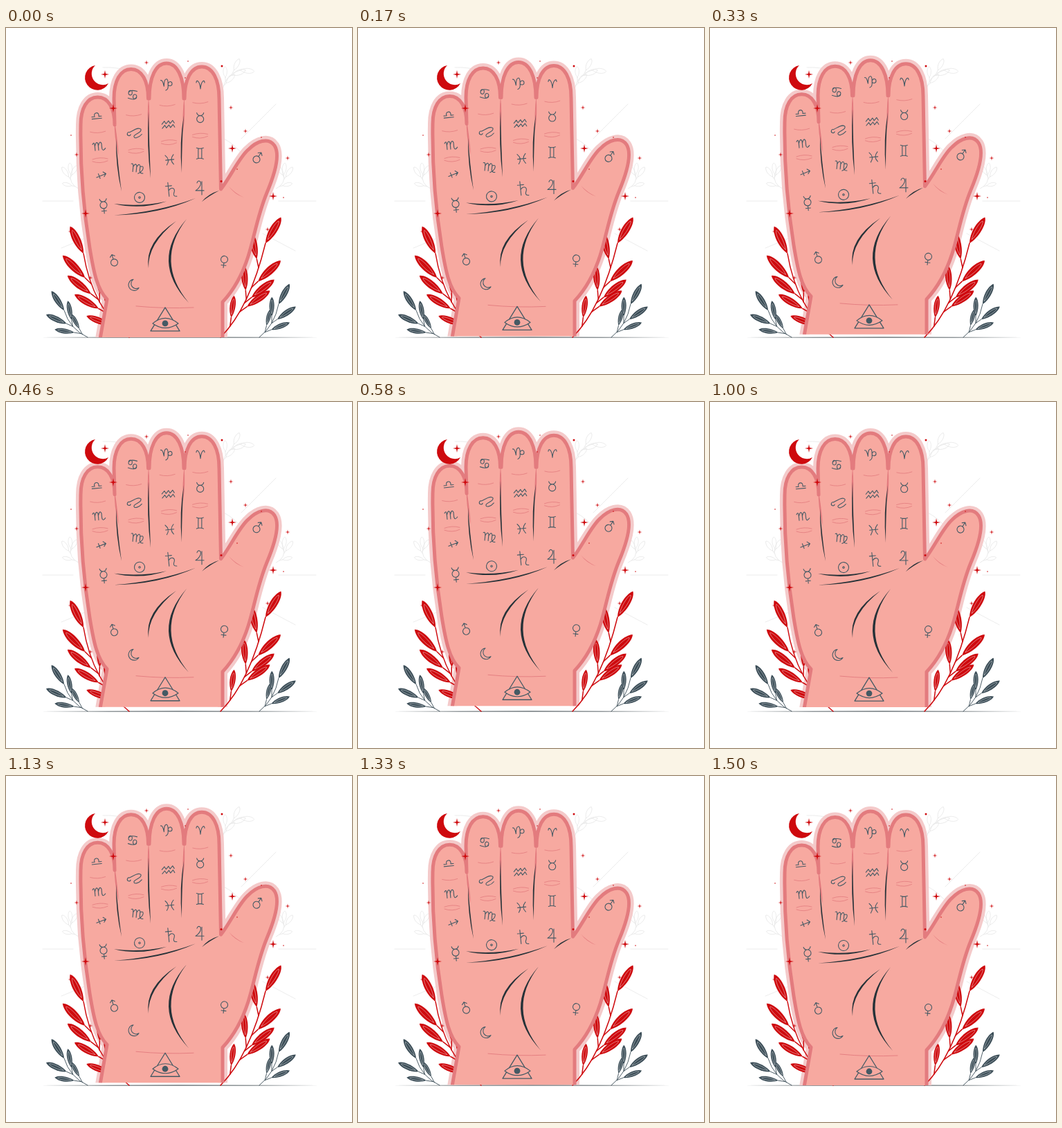
Write an HTML page with a canvas that moves like this. It is 500 px wide and 500 px high and loops after 1540 ms.

```html
<!DOCTYPE html>
<html lang="en">
<head>
<meta charset="utf-8">
<title>Palm reading</title>
<style>
html, body { margin: 0; width: 100%; height: 100%; overflow: hidden; background: #fff; }
canvas { display: block; width: 500px; height: 500px; }
</style>
</head>
<body>
<canvas id="stage"></canvas>
<script>
const LOOP = 1540, LEAD = 50, LIFT = 8.4, GROUND = 447, DEG = Math.PI / 180;
const RED = '#ce0a0e', SLATE = '#455a64', INK = '#263238', LEAF = '#3b4d57';
const SKIN = '#f7a9a0', EDGE = '#e37b7e', HALO = '#f4caca', FAINT = '#e8e8e8';

const canvas = document.getElementById('stage');
const ratio = window.devicePixelRatio || 1;
canvas.width = canvas.height = 500 * ratio;
const ctx = canvas.getContext('2d');
ctx.lineCap = ctx.lineJoin = 'round';

const mix = (a, b, u) => a + (b - a) * u;

function stroke(path, color, width) {
  ctx.strokeStyle = color;
  ctx.lineWidth = width;
  ctx.stroke(new Path2D(path));
}

function fill(path, color) {
  ctx.fillStyle = color;
  ctx.fill(new Path2D(path));
}

function place(x, y, angle, draw) {
  ctx.save();
  ctx.translate(x, y);
  ctx.rotate(angle);
  draw();
  ctx.restore();
}

function dot(x, y, r, color) {
  ctx.fillStyle = color;
  ctx.beginPath();
  ctx.arc(x, y, r, 0, 7);
  ctx.fill();
}

function star(x, y, r) {
  ctx.fillStyle = RED;
  ctx.beginPath();
  for (let k = 0; k < 8; k++) {
    const reach = k % 2 ? r * 0.24 : r;
    ctx.lineTo(x + reach * Math.cos(k * 45 * DEG), y + reach * Math.sin(k * 45 * DEG));
  }
  ctx.fill();
}

// A stroke that swells in the middle and ends in points.
function taper([x0, y0], [cx, cy], [x1, y1], w, color = INK) {
  const len = Math.hypot(x1 - x0, y1 - y0);
  const nx = (y0 - y1) / len * w, ny = (x1 - x0) / len * w;
  fill(`M${x0} ${y0}Q${cx + nx} ${cy + ny} ${x1} ${y1}Q${cx - nx} ${cy - ny} ${x0} ${y0}`, color);
}

function leaf(x, y, angle, len, color) {
  const blade = (s, w) => `M${len * (1 - s)} 0C${len * 0.3} ${-w} ${len * 0.78} ${-w} ${len * s} 0` +
    `C${len * 0.85} ${w} ${len * 0.3} ${w} ${len * (1 - s)} 0`;
  const w = len * 0.17;
  place(x, y, angle, () => {
    if (color === FAINT) return stroke(blade(1, w * 1.4), FAINT, 0.8);
    fill(blade(1, w), color);
    stroke(blade(0.85, w * 0.45), '#fff', 0.4);
  });
}

// A curved stem with stalked leaves; side is -1 when it leans left, 1 when right.
function sprig([from, bend, to], side, size, outer, inner, color) {
  const at = t => [0, 1].map(k => mix(mix(from[k], bend[k], t), mix(bend[k], to[k], t), t));
  const heading = t => Math.atan2(
    mix(bend[1] - from[1], to[1] - bend[1], t), mix(bend[0] - from[0], to[0] - bend[0], t));
  const width = color === RED ? 1.5 : 0.9;
  stroke(`M${from}Q${bend} ${to}`, color, width);
  leaf(...to, heading(1) + side * 17 * DEG, size * 0.95, color);

  const branch = (t, turn, len) => {
    const [x, y] = at(t), angle = heading(t) + side * turn * DEG;
    const bx = x + Math.cos(angle) * size * 0.28, by = y + Math.sin(angle) * size * 0.28;
    stroke(`M${x} ${y}L${bx} ${by}`, color, width);
    leaf(bx, by, angle, len * (0.75 + 0.35 * t), color);
  };
  for (const t of outer) branch(t, 25, size);
  for (const t of inner) branch(t, -30, size * 0.86);
}

function drawBackdrop() {
  stroke('M53 250H97M394 250H448M340 160L390 110M307 157Q322 161 338 178M371 297L418 322M80 318L116 303M140 57Q163 56 183 64', FAINT, 0.8);
  sprig([[312, 94], [316, 66], [339, 61]], 1, 21, [0.2, 0.55], [0.35, 0.7], FAINT);
  for (const side of [-1, 1]) {
    const x = d => 247.5 + side * d;
    sprig([[x(143), 232], [x(157), 225], [x(154), 211]], side, 17, [0.2, 0.7], [0.8], FAINT);
  }
}

function drawPlants() {
  sprig([[178, 447], [125, 405], [112, 326]], -1, 46, [0.15, 0.36, 0.53, 0.7], [0.3, 0.5], RED);
  sprig([[310, 447], [352, 405], [375, 311]], 1, 46, [0.36, 0.46, 0.62], [0.17, 0.5, 0.8], RED);
  sprig([[118, 447], [92, 435], [84, 408]], -1, 35, [0.2, 0.5], [0.15, 0.5], LEAF);
  sprig([[366, 447], [388, 430], [394, 399]], 1, 35, [0.2, 0.5], [0.2, 0.5], LEAF);
}

const RING = 'M-5 0A5 5 0 1 1 5 0A5 5 0 1 1 -5 0';
const HORNS = 'M-5 -9Q-4 -5 0 -5Q4 -5 5 -9';
const CROSS = 'M0 5V12M-3.5 8.5H3.5';
const MARS = RING + 'M0 -5V-12M-3.5 -9L0 -12L3.5 -9';
const SUN = 'M-7.5 0A7.5 7.5 0 1 1 7.5 0A7.5 7.5 0 1 1 -7.5 0M-1.2 0A1.2 1.2 0 1 1 1.2 0A1.2 1.2 0 1 1 -1.2 0';
const WAVE = 'l4 -4l2 4l4 -4l2 4l4 -4l2 4';

// Each finger: sides, tip and shoulder heights, then its column of signs from tip to palm.
const FINGERS = [
  { l: 108, r: 157, top: 100, shoulder: 140, from: [131, 128], to: [141, 256], bend: 0, tilt: -0.1, signs: [
    'M-7 3H7M-7 0H-3C-5 -7 5 -7 3 0H7',
    'M-9 -3Q-6 -8 -6 0V6V0Q-3 -9 -1 -3V6V0Q2 -9 4 -3V4Q5 9 9 4',
    'M-7 2L7 -2M3 -5L7 -2L4 2M-4 -3L-2 4',
    RING + HORNS + CROSS] },
  { l: 156, r: 205.5, top: 59.5, shoulder: 102, from: [183, 96], to: [193, 245], bend: 8, tilt: 0.1, signs: [
    'M-6 -2A2.6 2.6 0 1 1 -1 -2A2.6 2.6 0 1 1 -6 -2Q-5 -7 6 -5M1 3A2.6 2.6 0 1 1 6 3A2.6 2.6 0 1 1 1 3M6 3Q5 9 -6 6',
    'M-6 2A2.5 2.5 0 1 1 -8 -1C-4 -3 4 -11 8 -7C10 -2 0 0 -1 4C-1 8 6 6 10 0',
    'M-9 -5Q-6 -7 -6 0V6V-1Q-3 -8 -1 -3V6V-1Q2 -8 4 -3V4Q5 8 9 7M4 -2Q10 -5 8 2Q6 6 2 8',
    SUN] },
  { l: 207, r: 257, top: 51, shoulder: 102, from: [232, 81], to: [239, 235], bend: 8, tilt: -0.1, signs: [
    'M-8 -6Q-5 -7 -4 3Q-3 -8 1 -7Q3 -6 2 2Q2 8 -2 9M2 2C2 -4 8 -4 8 0C8 4 3 4 2 1',
    'M-9 -1' + WAVE + 'M-9 5' + WAVE,
    'M-6 -7Q1 0 -5 7M6 -7Q-1 0 5 7M-6 0H6',
    'M-4 -12V8M-8 -7H1M-4 0C0 -6 6 -3 4 2C2 6 2 9 7 9'] },
  { l: 258, r: 308, top: 56, shoulder: 102, from: [281, 82], to: [280, 231], bend: 0, tilt: 0, signs: [
    'M-6 -3C-6 -8 -1 -6 0 6C1 -6 6 -8 6 -3',
    RING + HORNS,
    'M-5 -8Q0 -6 5 -8M-5 8Q0 6 5 8M-2.5 -7V7M2.5 -7V7',
    'M-4 -7C-3 -12 3 -10 1 -4Q-1 1 -6 4H6M3 -9V10'] }
];

function fingertip({ l, r, top, shoulder }) {
  const mid = (l + r) / 2, w = (r - l) * 0.31, y = mix(top, shoulder, 0.4);
  return `L${l} ${shoulder}C${l} ${y} ${mid - w} ${top} ${mid} ${top}` +
    `C${mid + w} ${top} ${r} ${y} ${r} ${shoulder}`;
}

const HAND = 'M135 455L146 392C132 378 127 355 121 318C113 268 107 205 108 140' +
  FINGERS.map(fingertip).join('') +
  'L310.5 233C324 216 337 187 350 176C362 164 379 157 388 170C397 184 388 212 377 238' +
  'C363 272 359 302 350 330C341 358 328 380 313 396V455Z';

// Position along a finger's column, where u counts signs from the tip.
function along({ from, to, bend }, u) {
  return [mix(from[0], to[0], u / 3), mix(from[1], to[1], u / 3) + bend * Math.sin(u / 3 * Math.PI)];
}

function sign(path, x, y, angle) {
  place(x, y, angle, () => stroke(path, SLATE, 1.1));
}

function drawFinger(finger) {
  finger.signs.forEach((path, i) => sign(path, ...along(finger, i), finger.tilt));
  const crease = (u, dy, sag) => {
    const [x, y] = along(finger, u);
    stroke(`M${x - 11} ${y + dy}q11 ${sag} 22 -1`, EDGE, 0.8);
  };
  crease(0.5, 1, 3);
  crease(1.5, -2, -4);
  crease(1.5, 1, 4);
}

function drawPalm() {
  taper([206, 100], [206, 125], [206, 150], 2.5, EDGE);
  taper([257.5, 100], [257, 125], [256, 150], 2.5, EDGE);
  taper([157, 135], [158, 155], [163, 185], 2.5, EDGE);
  taper([159, 160], [160, 200], [167, 236], 1.7);
  taper([206, 121], [205, 170], [209, 217], 1.9);
  taper([257, 126], [252, 165], [254, 209], 1.9);

  taper([156, 254], [195, 261], [232, 250.5], 2.2);
  taper([156, 270.5], [220, 268], [274, 246], 2);
  taper([283, 251], [293, 241], [308, 235], 1.6);
  taper([246, 279], [202, 311], [206, 347], 2.6);
  taper([261, 276], [211, 337], [264, 397], 3.5);

  taper([322, 229], [331, 240], [344, 245], 0.8, EDGE);
  stroke('M188 402Q230 406 271 404', EDGE, 0.9);
}

function drawEye() {
  const lens = 'M212 427Q230 412 249 427Q230 440 212 427';
  stroke('M230 404L209 438H251Z', SLATE, 1.3);
  fill(lens, SKIN);
  stroke(lens, SLATE, 1.2);
  dot(230, 427, 4.4, SLATE);
}

function drawHand() {
  fill(HAND, SKIN);
  stroke(HAND, EDGE, 5);
  drawPalm();
  FINGERS.forEach(drawFinger);
  sign(MARS, 362, 190, 0.6);
  sign(MARS, 156.5, 339, -0.3);
  sign(RING + CROSS, 315.5, 334.5, 0.12);
  sign('M0 -8A8 8 0 1 0 8 4A7 7 0 1 1 0 -8', 184, 371.5, 0);
  drawEye();
}

function drawSky() {
  fill('M129 54A18 18 0 1 0 148 80A16.2 16.2 0 0 1 129 54', RED);
  const scatter = (spots, draw, r) => spots.forEach(([x, y]) => draw(x, y, r, RED));
  scatter([[143, 67], [155, 116], [115, 268], [327, 174], [386, 243]], star, 6);
  scatter([[203, 50], [102, 183], [93, 294], [122, 361], [325, 115], [346, 149], [407, 188], [378, 291]], star, 3.5);
  scatter([[312, 55], [311, 221.5]], dot, 1.5);
  scatter([[259, 72], [369, 158], [401, 245], [94, 155], [263, 48], [334, 204]], dot, 0.8);
}

function raised(dy, draw) {
  ctx.save();
  ctx.translate(0, dy);
  ctx.beginPath();
  ctx.rect(0, 0, 500, GROUND);
  ctx.clip();
  draw();
  ctx.restore();
}

function render(now) {
  const phase = (now + LEAD) / LOOP * 2 * Math.PI;
  const dy = -LIFT * (1 - Math.cos(phase)) / 2;
  ctx.setTransform(ratio, 0, 0, ratio, 0, 0);
  ctx.fillStyle = '#fff';
  ctx.fillRect(0, 0, 500, 500);
  drawBackdrop();
  taper([48, GROUND], [250, GROUND], [454, GROUND], 1);
  raised(dy, () => stroke(HAND, HALO, 14));
  drawPlants();
  raised(dy, drawHand);
  drawSky();
}

const start = performance.now();
function tick() {
  render(performance.now() - start);
  requestAnimationFrame(tick);
}
tick();
</script>
</body>
</html>
```
